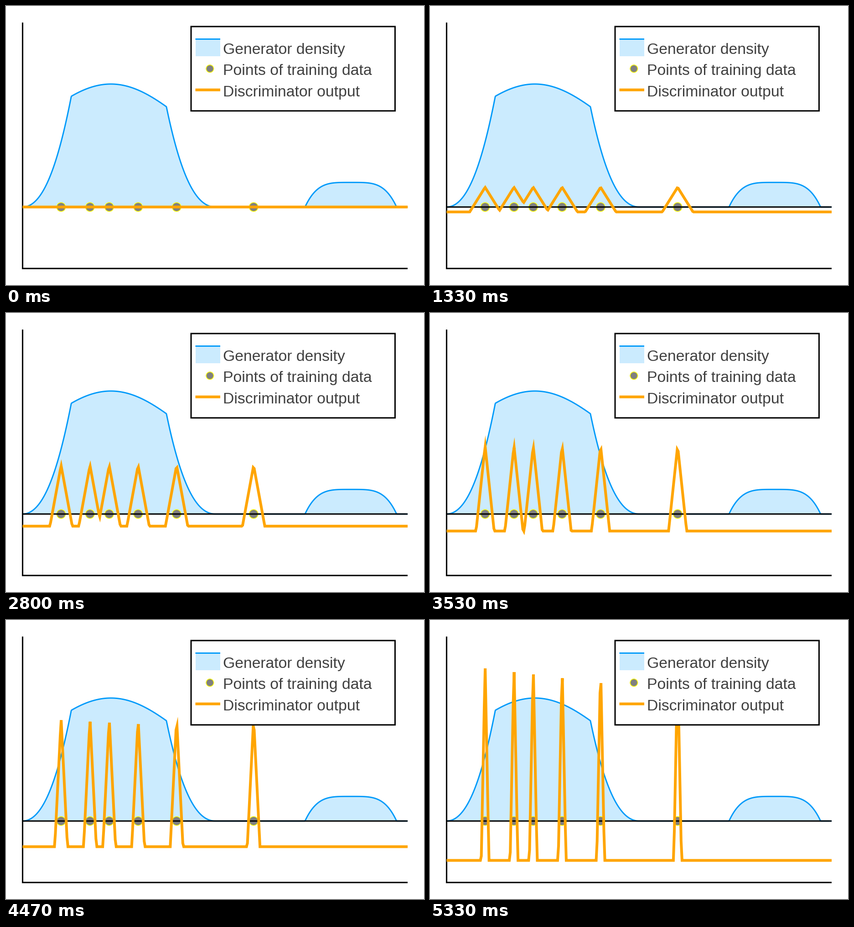
Write a matplotlib script that moves like this. It is 917 by 611 pixels and loops after 5390 ms.

```python
import numpy as np
import matplotlib.pyplot as plt
from matplotlib.animation import FuncAnimation
from matplotlib.collections import PolyCollection
from matplotlib.patches import Circle, Rectangle

W, H, DPI = 917, 611, 100
FRAMES, LOOP_MS = 81, 5390
PT = 72 / DPI                      # points per pixel
X0, X_UNIT = 36.4, 84.47           # pixel position of x = 0, pixels per unit
Y0, Y_UNIT = 440.2, 134.65
BLUE, PALE, ORANGE = "#009afa", "#cbebfe", "#ffa500"
HALF = 3.0                         # half the orange stroke, in pixels
MITER_LIMIT = 10

POINTS = np.array([1, 1.75, 2.25, 3, 4, 6])
GRID = np.linspace(0, 10, 400)
DIST = np.abs(GRID[:, None] - POINTS).min(axis=1)

plt.rcParams["path.simplify"] = False
plt.rcParams["font.family"] = "Liberation Sans"

fig = plt.figure(figsize=(W / DPI, H / DPI), dpi=DPI, facecolor="white")
ax = fig.add_axes([0, 0, 1, 1])
ax.set_xlim(0, W)
ax.set_ylim(H, 0)
ax.axis("off")


def stroke(x, y, color, width, z, **kw):
    kw = {"solid_capstyle": "butt", "solid_joinstyle": "bevel", **kw}
    return ax.plot(x, y, color=color, lw=width * PT, zorder=z, snap=False, **kw)[0]


def dot(x, y, radius, z):
    ax.add_patch(Circle((x, y), radius, fc="#808080", ec="#ffff00",
                        lw=1.5 * PT, zorder=z))


def density(x):
    """Generator density: a crown with quadratic flanks, and a flat bump."""
    crown = 2 - 0.557 * (1 - np.cos(0.85 * (x - 2.292)))
    flank = np.clip(np.minimum(x, 5 - x) / 1.265, 0, 1) ** 2
    bump = 0.4 - 0.2 * (x - 8.524) ** 4
    return crown * flank + np.maximum(bump, 0)


def discriminator(s):
    """Pixel path of the output at progress s: peaks narrow as they grow."""
    width = 0.5 - 0.4 * s
    height = 1.013 * s / np.sqrt(width)
    y = height * (np.maximum(1 - DIST / width, 0) - 0.2)
    return np.column_stack([X0 + X_UNIT * GRID, Y0 - Y_UNIT * y])


def miter_tips(path):
    """Quads that sharpen the bevelled corners up to the miter limit."""
    d = np.diff(path, axis=0)
    d /= np.hypot(d[:, 0], d[:, 1])[:, None]
    a, b, p = d[:-1], d[1:], path[1:-1]
    cross = a[:, 0] * b[:, 1] - a[:, 1] * b[:, 0]
    dots = (a * b).sum(axis=1)
    ratio = 1 / np.sqrt(np.maximum((1 + dots) / 2, 1e-9))
    keep = (np.abs(cross) > 1e-3) & (ratio < MITER_LIMIT)
    a, b, p = a[keep], b[keep], p[keep]
    side = HALF * np.sign(cross[keep])[:, None]
    n1 = side * np.column_stack([a[:, 1], -a[:, 0]])
    n2 = side * np.column_stack([b[:, 1], -b[:, 0]])
    tip = p + (n1 + n2) / (1 + dots[keep])[:, None]
    return np.stack([p, p + n1, tip, p + n2], axis=1)


# Generator density
units = np.linspace(0, 10, 1500)
xs, ys = X0 + X_UNIT * units, Y0 - Y_UNIT * density(units)
ax.fill_between(xs, ys, Y0, color=PALE, lw=0, zorder=1)
stroke(xs, ys, BLUE, 2.9, 2)

# Training points and axes
for point in POINTS:
    dot(X0 + X_UNIT * point, Y0, 9.7, 3)
right, bottom = X0 + 10 * X_UNIT, Y0 + Y_UNIT
stroke([X0, right], [Y0, Y0], "black", 3, 4)
stroke([X0, X0, right], [Y0 - 3 * Y_UNIT, bottom, bottom], "black", 3, 4,
       solid_joinstyle="miter")

# Discriminator output
curve = stroke([], [], ORANGE, 2 * HALF, 5)
tips = PolyCollection([], facecolors=ORANGE, edgecolors="none", zorder=5)
ax.add_collection(tips, autolim=False)

# Legend
ax.add_patch(Rectangle((406, 45), 447.5, 184.7, fc="white", ec="black",
                       lw=3 * PT, joinstyle="miter", snap=False, zorder=6))
ax.add_patch(Rectangle((415.5, 72.5), 54.5, 37, fc=PALE, ec="none", zorder=7))
stroke([415.5, 470], [72.5, 72.5], BLUE, 2.9, 8)
dot(447.3, 137.3, 8.2, 8)
stroke([415.5, 470], [183.7, 183.7], ORANGE, 2 * HALF, 8)
for label, y in [("Generator density", 105.3),
                 ("Points of training data", 151.3),
                 ("Discriminator output", 197.6)]:
    ax.text(476.5, y, label, size=33.8 * PT, color="#404040",
            va="baseline", zorder=9)


def update(frame):
    path = discriminator(frame / (FRAMES - 1))
    curve.set_data(path[:, 0], path[:, 1])
    tips.set_verts(list(miter_tips(path)))
    return curve, tips


anim = FuncAnimation(fig, update, frames=FRAMES, interval=LOOP_MS / FRAMES,
                     repeat=True, repeat_delay=0, blit=False)
plt.show()
```
